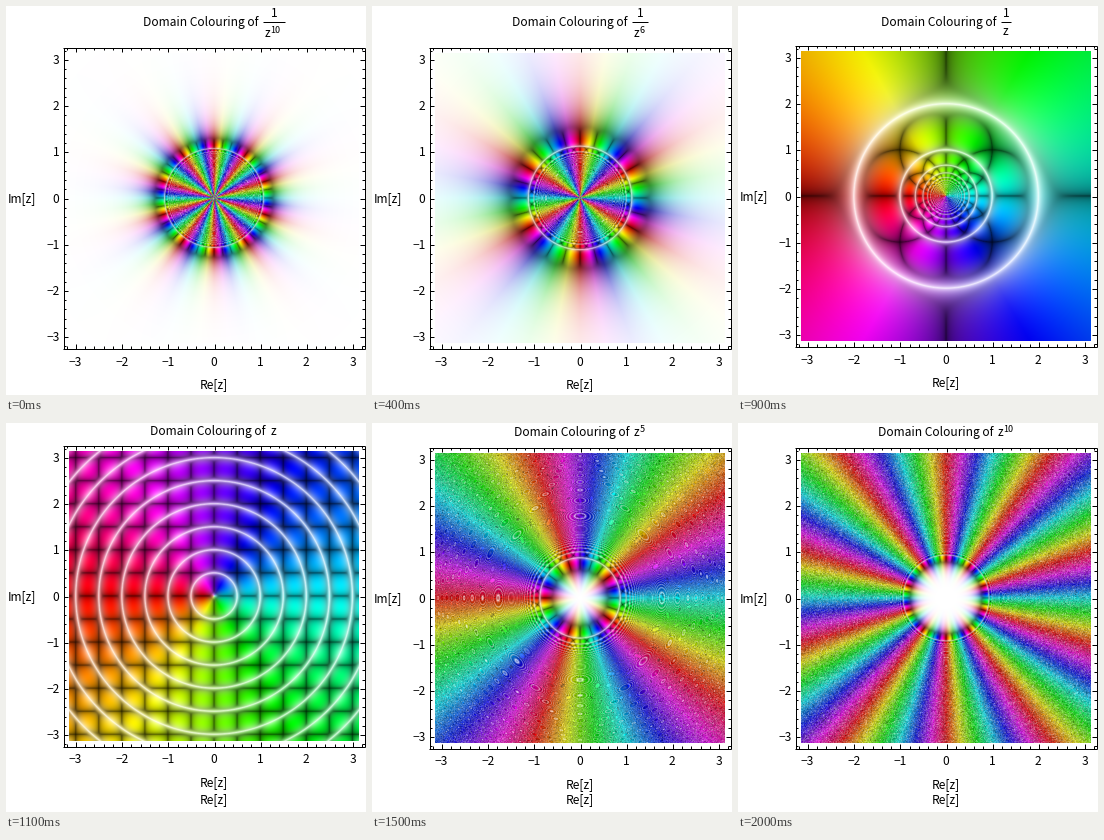
These frames come from a looping animation (360 px wide and 389 px high, 2.1 s). A matplotlib script:

```python
import numpy as np
import matplotlib.pyplot as plt
from matplotlib.animation import FuncAnimation
from matplotlib.collections import LineCollection

W, H, DPI = 360, 389, 100
PT = 72 / DPI                 # points per pixel
CX, HALF, EDGE = 208, 145, 150.5
UNIT = HALF / np.pi           # pixels per plot unit
POWERS = range(-10, 11)

plt.rcParams["font.family"] = "Noto Sans CJK JP"
plt.rcParams["toolbar"] = "None"

grid = np.arange(-np.pi, np.pi, 0.01)
X, Y = np.meshgrid(grid, grid[::-1])
R, THETA = np.hypot(X, Y), np.arctan2(Y, X)


def colour(n):
    """Domain colouring of z**n: hue from the argument, white rings, dark grid."""
    r, a = R ** float(n), THETA * n
    hue = 0.5 + a / (2 * np.pi)
    s = np.abs(np.sin(2 * np.pi * r))
    re, im = r * np.cos(a), r * np.sin(a)
    b = np.sqrt(np.sqrt(np.abs(np.sin(2 * np.pi * re) * np.sin(2 * np.pi * im))))
    v = 0.5 * (1 - s + b + np.sqrt((1 - s - b) ** 2 + 0.01))
    sat = np.sqrt(s)
    rgb = np.empty(R.shape + (3,), np.uint8)
    for k in range(3):
        ramp = np.clip(np.abs((hue * 6 - 2 * k) % 6 - 3) - 1, 0, 1)
        rgb[..., k] = 255 * np.clip(v * (1 - sat + sat * ramp), 0, 1)
    return rgb


images = [colour(n) for n in POWERS]

fig = plt.figure(figsize=(W / DPI, H / DPI), dpi=DPI, facecolor="white")
ax = fig.add_axes([0, 0, 1, 1])


def label(x, y, s, ha="center", size=12):
    ax.text(x, y, s, ha=ha, va="baseline", fontsize=size * PT, color="black")


def lines(segs):
    ax.add_collection(LineCollection(segs, colors="black", linewidths=PT,
                                     capstyle="butt"))


def title(n):
    digits = len(str(abs(n))) if abs(n) > 1 else 0
    w = 10 + 6 * digits if n < 0 else 7 + 5 * digits
    x0 = CX - (120 + w) / 2
    x = x0 + 120
    if n < 0:
        text_y, z_y, z_x = 20, 31 if digits else 29, x + 1.5
        label(x + w / 2, 11, "1")
        lines([[(x, 15.5), (x + w, 15.5)]])
    else:
        text_y, z_x = 13 if digits else 12, x
        z_y = text_y
    label(x0, text_y, "Domain Colouring of", "left")
    label(z_x, z_y, "z" if n else "1", "left")
    if digits:
        label(z_x + 6, z_y - 4, str(abs(n)), "left", 9)


def centre(n):
    """Height of the plot's middle, set by how tall the title is."""
    if n < 0:
        return 190 if n == -1 else 192
    return 175 if n > 1 else 173


def frame(cy):
    l, r, t, b = CX - EDGE, CX + EDGE, cy - EDGE, cy + EDGE
    lines([[(l - .5, t), (r + .5, t)], [(l - .5, b), (r + .5, b)],
           [(l, t), (l, b)], [(r, t), (r, b)]])
    ticks = []
    for k in range(-16, 17):
        d = k * UNIT / 5
        size = 4.5 if k % 5 == 0 else 2.5
        x, y = np.floor(CX + d) + .5, np.floor(cy - d) + .5
        ticks += [[(x, t), (x, t + size)], [(x, b), (x, b - size)],
                  [(l, y), (l + size, y)], [(r, y), (r - size, y)]]
    lines(ticks)
    for k in range(-3, 4):
        s = str(k).replace("-", "\u2212")
        label(CX + k * UNIT, cy + 167.5, s)
        label(53.5, cy - k * UNIT + 4.5, s, "right")
    label(15.5, cy + 4, "Im[z]")
    label(CX, cy + 190.5, "Re[z]")


def draw(i):
    n = POWERS[i]
    cy = centre(n)
    ax.clear()
    ax.axis("off")
    ax.imshow(images[i], interpolation="hanning", aspect="auto",
              extent=(CX - HALF, CX + HALF, cy + HALF, cy - HALF))
    ax.set(xlim=(0, W), ylim=(H, 0))
    frame(cy)
    title(n)
    if n >= 0:
        # the lower axis label stays visible under the shorter plots
        label(CX, centre(-1) + 190.5, "Re[z]")
    return ax.get_children()


anim = FuncAnimation(fig, draw, frames=len(POWERS), interval=100,
                     init_func=lambda: draw(0), repeat=True, repeat_delay=0)
plt.show()
```
